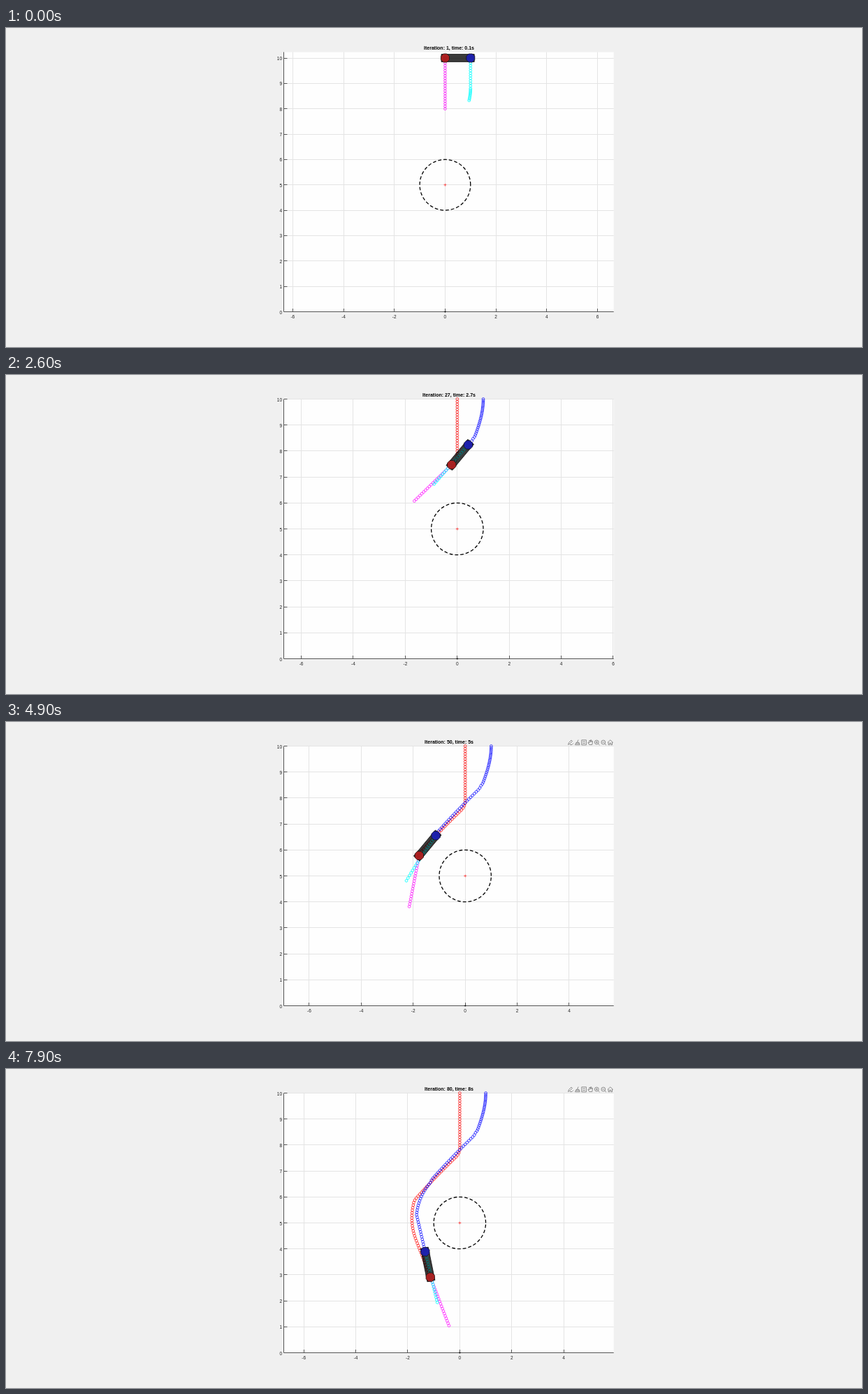
An HTML page with a canvas for the animation above (8 s loop, 1225 px wide and 457 px high).

```html
<!DOCTYPE html>
<html lang="en">
<head>
<meta charset="utf-8">
<title>Trajectory around an obstacle</title>
<style>
  html, body { margin: 0; width: 100%; height: 100%; overflow: hidden; background: #f0f0f0; }
  canvas { display: block; }
</style>
</head>
<body>
<canvas id="stage" width="1225" height="457"></canvas>
<script>
const ctx = document.getElementById('stage').getContext('2d');
const STEPS = 80, STEP_MS = 100, SPEED = 0.1, HORIZON = 20, TOOLBAR_STEP = 32;
const LEFT = 397.7, RIGHT = 869.7, TOP = 34.5, BOTTOM = 406.5, MID = (LEFT + RIGHT) / 2;
const FONT = '"Liberation Sans", Arial, sans-serif';

const clamp = (v, low, high) => Math.min(high, Math.max(low, v));
const rad = degrees => degrees * Math.PI / 180;
const ramp = (step, from, to, amount) => amount * clamp((step - from) / (to - from), 0, 1);

// Degrees from straight down: swerve left, ease, straighten, then curve back around the obstacle
const heading = s => ramp(s, 20.7, 24.5, -46) + ramp(s, 25, 46, 4) + ramp(s, 46.5, 49, 31) + ramp(s, 50, 63, 32);
// Direction from the red end to the blue end, in degrees
const link = s => ramp(s, 0, 23, 50.2) + ramp(s, 49, 64, 39.3) + ramp(s, 64, 79, 12);

const forward = (p, degrees, d) => ({ x: p.x + d * Math.sin(rad(degrees)), y: p.y - d * Math.cos(rad(degrees)) });
const linked = (p, degrees) => ({ x: p.x + Math.cos(rad(degrees)), y: p.y + Math.sin(rad(degrees)) });

const redPath = [{ x: 0, y: 10 }];
for (let i = 0; i < STEPS - 1; i++) redPath.push(forward(redPath[i], heading(i), SPEED));
const bluePath = redPath.map((p, i) => linked(p, link(i)));

// Red runs straight ahead while blue swings in behind it at a limited rate
function plan(step) {
  const delay = Math.max(0, 12 - 3 * step);
  const turn = clamp(1.6 * (90 + heading(step) - link(step)), -48, 48) / HORIZON;
  const red = [], blue = [];
  for (let k = 0; k <= HORIZON; k++) {
    red.push(forward(redPath[step], heading(step), SPEED * k));
    blue.push(linked(red[k], link(step) + turn * Math.max(0, k - delay)));
  }
  return { red, blue };
}

function line(color, width, ...points) {
  ctx.strokeStyle = color;
  ctx.lineWidth = width;
  ctx.beginPath();
  points.forEach(([x, y]) => ctx.lineTo(x, y));
  ctx.stroke();
}
function text(value, x, y, align, font) {
  ctx.font = font;
  ctx.textAlign = align;
  ctx.fillText(value, x, y);
}
function polygon(x, y, radius, sides) {
  ctx.beginPath();
  for (let k = 0; k < sides; k++) {
    const a = (k + 0.5) * 2 * Math.PI / sides;
    ctx.lineTo(x + radius * Math.cos(a), y + radius * Math.sin(a));
  }
  ctx.closePath();
  ctx.fill();
  ctx.stroke();
}

function drawToolbar() {
  const icon = d => ctx.stroke(new Path2D(d));
  ctx.save();
  ctx.strokeStyle = '#777';
  ctx.lineWidth = 0.8;
  ctx.translate(804, 25.5);
  icon('M.5 7l1-3 3.500-3.500 1.500 1.500-3.500 3.500zM3 7h3l2-2');
  ctx.translate(10.5, 0);
  icon('M4.500 0L3 3.500l2.500.5 1 3.200H0L1.500 4H3M1 5.300h5');
  ctx.translate(9.3, 0);
  icon('M0 .3h6.600v7H0zM1.500 2.500H5M1.500 5H5');
  ctx.translate(9, 0);
  icon('M2 7L0 4l1-.5 1 1V1h1.300l.5 2V.3H5V3l1-1.500.8.7L6 7z');
  for (const bars of ['M1.500 3.500h3M3 2v3', 'M1.500 3.500h3']) {
    ctx.translate(9.5, 0);
    icon('M5.900 3.500a2.900 2.900 0 1 0-5.800 0a2.900 2.900 0 1 0 5.800 0M5 5.500l2.200 2.200' + bars);
  }
  ctx.translate(9, 0);
  icon('M0 4L4 .3 8 4M1.300 3.500v3.700h1.800V4.700h1.800v2.500h1.800V3.500');
  ctx.restore();
}

function draw(step) {
  const red = redPath[step], blue = bluePath[step], planned = plan(step);
  const redTrail = redPath.slice(0, step + 1), blueTrail = bluePath.slice(0, step + 1);

  // Equal axes fitted to everything plotted
  const xs = [...redTrail, ...planned.red, ...planned.blue].map(p => p.x);
  const minX = Math.min(-1, red.x - 0.24, blue.x - 0.24, ...xs);
  const maxX = Math.max(1, blue.x + 0.29);
  const unit = (BOTTOM - TOP) / Math.max(10, blue.y + 0.234);
  const X = x => MID + (x - (minX + maxX) / 2) * unit;
  const Y = y => BOTTOM - y * unit;
  const snap = v => Math.floor(v) + 0.5;

  ctx.fillStyle = '#f0f0f0';
  ctx.fillRect(0, 0, 1225, 457);
  ctx.fillStyle = '#fefefe';
  ctx.fillRect(LEFT, TOP, RIGHT - LEFT, BOTTOM - TOP);

  const columns = [-6, -4, -2, 0, 2, 4, 6].filter(v => X(v) >= LEFT && X(v) <= RIGHT);
  const rows = Array.from({ length: 11 }, (_, v) => v);
  columns.forEach(v => line('#e4e4e4', 1, [snap(X(v)), TOP], [snap(X(v)), BOTTOM]));
  rows.forEach(v => line('#e4e4e4', 1, [LEFT, snap(Y(v))], [RIGHT, snap(Y(v))]));

  line('#555', 1, [397.5, TOP], [397.5, BOTTOM], [RIGHT, BOTTOM]);
  ctx.fillStyle = '#262626';
  columns.forEach(v => {
    line('#555', 1, [snap(X(v)), BOTTOM], [snap(X(v)), BOTTOM - 4.5]);
    text(v, X(v), 415.8, 'center', '6.5px ' + FONT);
  });
  rows.forEach(v => {
    line('#555', 1, [398, snap(Y(v))], [402.5, snap(Y(v))]);
    text(v, 395, Y(v) + 3, 'right', '6.5px ' + FONT);
  });
  ctx.fillStyle = '#000';
  text(`Iteration: ${step + 1}, time: ${(step + 1) / 10}s`, 634, 31, 'center', 'bold 7px ' + FONT);

  const cross = (x, y, r, color) => {
    line(color, 0.6, [x - r, y], [x + r, y]);
    line(color, 0.6, [x, y - r], [x, y + r]);
  };
  cross(X(0), Y(5), 2, '#f00');
  cross(X(0), Y(0), 1.6, '#000');

  ctx.strokeStyle = '#000';
  ctx.lineWidth = 1.3;
  ctx.setLineDash([4.8, 3]);
  ctx.beginPath();
  ctx.arc(X(0), Y(5), unit, 0, -2 * Math.PI, true);
  ctx.stroke();
  ctx.setLineDash([]);

  const dots = (points, color) => {
    ctx.strokeStyle = color;
    ctx.lineWidth = 0.7;
    for (const p of points) {
      ctx.beginPath();
      ctx.arc(X(p.x), Y(p.y), 1.9, 0, 7);
      ctx.stroke();
    }
  };
  dots(redTrail, '#f00');
  dots(blueTrail, '#00f');
  dots(planned.red, '#f0f');
  dots(planned.blue, '#0ff');

  ctx.save();
  ctx.translate(X(red.x), Y(red.y));
  ctx.rotate(-rad(link(step)));
  ctx.strokeStyle = '#000';
  ctx.lineWidth = 0.7;
  ctx.fillStyle = 'rgba(0,0,0,0.77)';
  ctx.beginPath();
  ctx.rect(-0.15 * unit, -0.15 * unit, 1.3 * unit, 0.3 * unit);
  ctx.fill();
  ctx.stroke();
  ctx.restore();

  dots(planned.blue, 'rgba(0,255,255,0.3)');
  for (const [p, color] of [[red, 'rgba(190,28,28,0.85)'], [blue, 'rgba(28,28,190,0.85)']]) {
    ctx.strokeStyle = '#111';
    ctx.fillStyle = color;
    polygon(X(p.x), Y(p.y), 0.18 * unit, 8);
  }

  if (step >= TOOLBAR_STEP) drawToolbar();
}

const begin = performance.now();
function tick() {
  draw(Math.floor((performance.now() - begin) / STEP_MS) % STEPS);
  requestAnimationFrame(tick);
}
tick();
</script>
</body>
</html>
```
